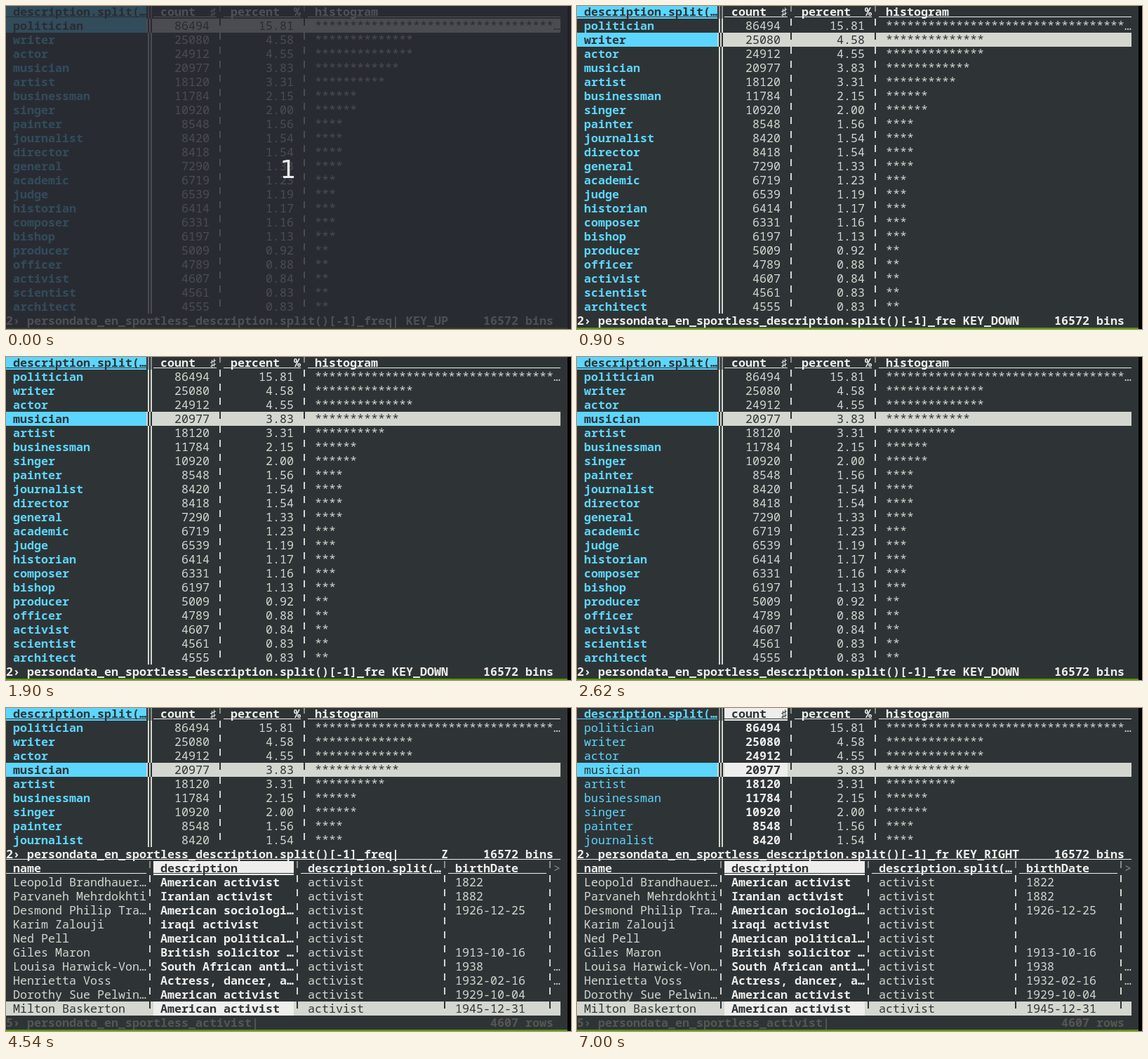
These frames come from a looping animation (805x460 px, 8 s). An HTML page with a canvas:

```html
<!DOCTYPE html>
<html lang="en">
<head>
<meta charset="utf-8">
<style>
  html, body { margin: 0; width: 100%; height: 100%; overflow: hidden; background: #000; }
  canvas { display: block; }
</style>
</head>
<body>
<canvas id="stage" width="805" height="460"></canvas>
<script>
const ctx = document.getElementById('stage').getContext('2d');
const CELL = 10, LINE = 20, TOP = -2, LOOP = 8000;
const FONT = '16.667px "Noto Sans Mono", "DejaVu Sans Mono", monospace';
const BG = '#2e3436', FG = '#d3d7cf', BRIGHT = '#eeeeec', CYAN = '#5cd6ff',
      DIM = '#555753', RULE = '#888d8a', GREEN = '#4e9a06';

const TOTAL = 547230;
const bins = Object.entries({
  politician: 86494, writer: 25080, actor: 24912, musician: 20977, artist: 18120,
  businessman: 11784, singer: 10920, painter: 8548, journalist: 8420, director: 8418,
  general: 7290, academic: 6719, judge: 6539, historian: 6414, composer: 6331,
  bishop: 6197, producer: 5009, officer: 4789, activist: 4607, scientist: 4561,
  architect: 4555
});

const people = [
  ['Leopold Brandhauer…', 'American activist', '1822'],
  ['Parvaneh Mehrdokhti', 'Iranian activist', '1882'],
  ['Desmond Philip Tra…', 'American sociologi…', '1926-12-25'],
  ['Karim Zalouji', 'iraqi activist', ''],
  ['Ned Pell', 'American political…', ''],
  ['Giles Maron', 'British solicitor …', '1913-10-16'],
  ['Louisa Harwick-Von…', 'South African anti…', '1938', '…'],
  ['Henrietta Voss', 'Actress, dancer, a…', '1932-02-16', '…'],
  ['Dorothy Sue Pelwin…', 'American activist', '1929-10-04'],
  ['Milton Baskerton', 'American activist', '1945-12-31']
];

const states = [
  { at: 0, cursor: 1, key: 'KEY_UP', countdown: '1' },
  { at: 500, cursor: 1, key: 'KEY_UP' },
  { at: 900, cursor: 2, key: 'KEY_DOWN' },
  { at: 1300, cursor: 3, key: 'KEY_DOWN' },
  { at: 1900, cursor: 4, key: 'KEY_DOWN' },
  { at: 3100, cursor: 4, key: 'Z', split: true },
  { at: 5500, cursor: 4, key: 'KEY_RIGHT', split: true, onCount: true }
];

const rowY = row => TOP + row * LINE;

function rect(x, y, w, h, color) {
  ctx.fillStyle = color;
  ctx.fillRect(x, y, w, h);
}

function fillCells(row, from, to, color) {
  rect(from * CELL, rowY(row), (to - from) * CELL, LINE, color);
}

function underline(row, from, to, color) {
  rect(from * CELL, rowY(row) + 17, (to - from) * CELL, 1, color);
}

// Every character sits on the terminal grid.
function write(row, col, text, color = FG, bold = false) {
  ctx.font = (bold ? 'bold ' : '') + FONT;
  ctx.fillStyle = color;
  [...text].forEach((ch, i) => {
    if (ch !== ' ') ctx.fillText(ch, (col + i) * CELL, rowY(row) + 16);
  });
}

function writeRight(row, end, text, color, bold) {
  write(row, end - text.length, text, color, bold);
}

function heading(row, from, to, text, color = BRIGHT, back = BG) {
  fillCells(row, from, to, back);
  write(row, from + 1, text, color, true);
  underline(row, from, to, color);
}

function tick(row, col, color) {
  rect(col * CELL + 4, rowY(row), 2, 10, color);
}

function doubleBar(row, color) {
  for (const dx of [2, 6]) rect(200 + dx, rowY(row), 2, LINE, color);
}

function frequencyTable({ cursor, split, onCount }) {
  if (onCount) {
    heading(0, 0, 20, 'description.split(…', CYAN);
    heading(0, 21, 30, 'count  ♯', BG, BRIGHT);
  } else {
    heading(0, 0, 20, 'description.split(…', BG, CYAN);
    heading(0, 21, 30, 'count  ♯');
  }
  heading(0, 31, 42, 'percent  %');
  heading(0, 43, 79, 'histogram');
  doubleBar(0, RULE);
  tick(0, 30, RULE);
  tick(0, 42, RULE);

  bins.slice(0, split ? 9 : bins.length).forEach(([word, count], i) => {
    const row = i + 1, active = row === cursor, ink = active ? BG : FG;
    if (active) {
      fillCells(row, 0, 20, CYAN);
      fillCells(row, 20, 79, FG);
      if (onCount) fillCells(row, 21, 30, BRIGHT);
    }
    doubleBar(row, ink);
    tick(row, 30, ink);
    tick(row, 42, ink);
    write(row, 1, word, active ? BG : CYAN, !onCount);
    writeRight(row, 29, String(count), onCount && !active ? BRIGHT : ink, onCount);
    writeRight(row, 41, (100 * count / TOTAL).toFixed(2), ink);
    const stars = Math.floor(50 * count / bins[0][1]);
    write(row, 44, stars > 35 ? '*'.repeat(34) + '…' : '*'.repeat(stars), ink);
  });
}

function frequencyStatus({ key, split }) {
  const row = split ? 10 : 22;
  const title = '2› persondata_en_sportless_description.split()[-1]_freq|';
  write(row, 0, title.slice(0, 62 - key.length), BRIGHT, true);
  writeRight(row, 63, key, BRIGHT, true);
  writeRight(row, 78, '16572 bins', BRIGHT, true);
  if (split) underline(row, 0, 79, BRIGHT);
}

function peopleTable() {
  const separators = [20, 41, 62, 77];
  heading(11, 0, 20, 'name');
  heading(11, 21, 41, 'description', BG, BRIGHT);
  heading(11, 42, 62, 'description.split(…');
  heading(11, 63, 77, 'birthDate');
  write(11, 78, '>', RULE);
  separators.forEach(col => tick(11, col, RULE));

  people.forEach(([name, description, born, more = ''], i) => {
    const row = 12 + i, active = i === people.length - 1, ink = active ? BG : FG;
    if (active) {
      fillCells(row, 0, 79, FG);
      fillCells(row, 21, 41, BRIGHT);
    }
    separators.forEach(col => tick(row, col, ink));
    write(row, 1, name, ink);
    write(row, 22, description, active ? BG : BRIGHT, true);
    write(row, 43, 'activist', ink);
    write(row, 64, born, ink);
    write(row, 78, more, ink);
  });

  write(22, 0, '5› persondata_en_sportless_activist|', DIM, true);
  writeRight(22, 78, '4607 rows', DIM, true);
}

function drawCountdown(digit) {
  rect(0, 0, 805, 460, 'rgba(40, 42, 51, 0.8)');
  ctx.font = '36px "DejaVu Sans", sans-serif';
  ctx.fillStyle = BRIGHT;
  ctx.textAlign = 'center';
  ctx.fillText(digit, 402, 245);
  ctx.textAlign = 'left';
}

function draw(time) {
  const state = states.findLast(s => s.at <= time);
  rect(0, 0, 805, 460, '#000');
  rect(0, 0, 800, 458, BG);
  rect(0, 458, 800, 2, GREEN);
  frequencyTable(state);
  frequencyStatus(state);
  if (state.split) peopleTable();
  if (state.countdown) drawCountdown(state.countdown);
}

const start = performance.now();
function loop() {
  draw((performance.now() - start) % LOOP);
  requestAnimationFrame(loop);
}
loop();
</script>
</body>
</html>
```
